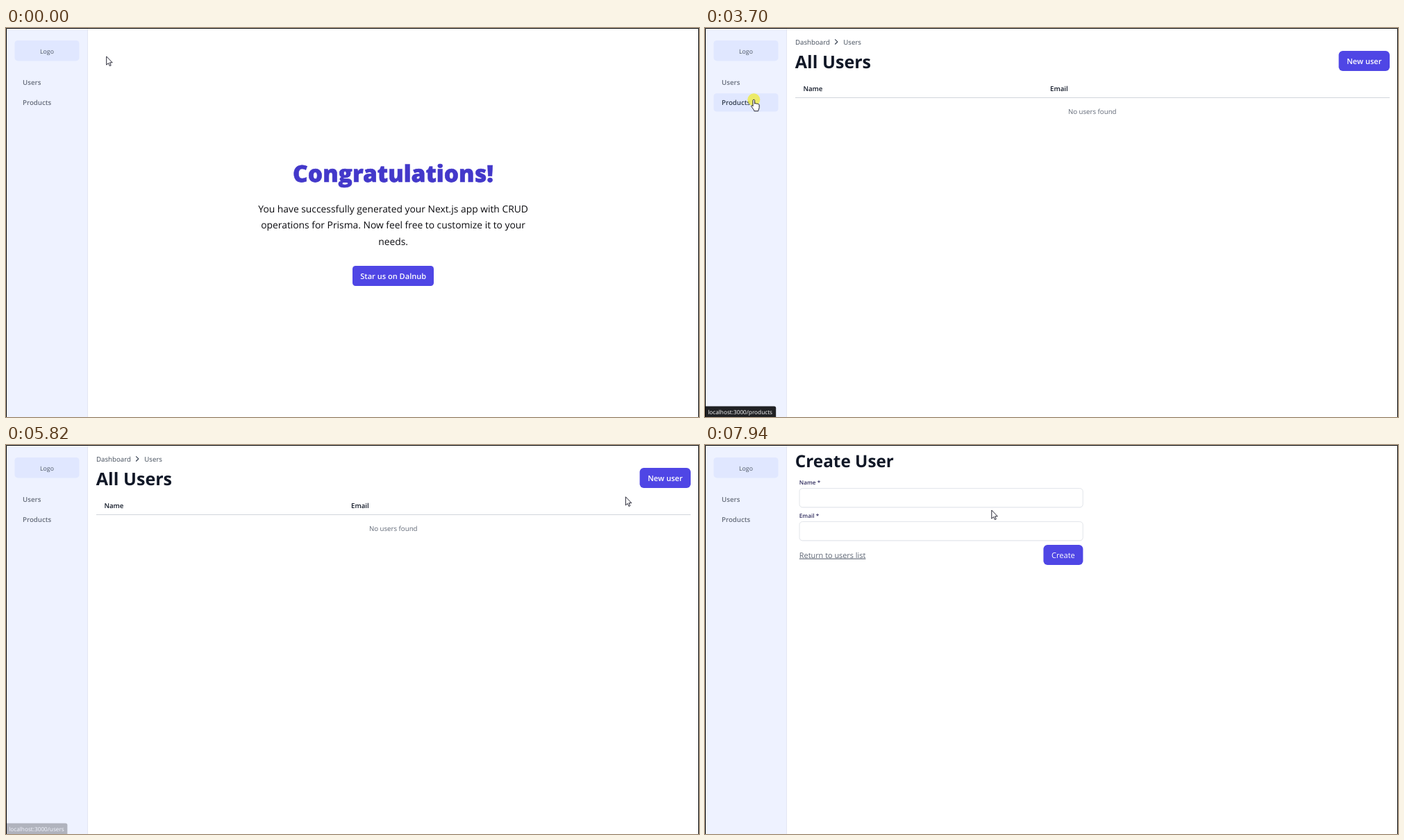
An HTML page that plays this animation: 998x561 px, repeating every 8000 ms.

```html
<!DOCTYPE html>
<html lang="en">
<head>
<meta charset="utf-8">
<title>Admin dashboard</title>
<style>
  html, body { margin: 0; width: 100%; height: 100%; overflow: hidden; background: #fff; }
  svg { display: block; width: 998px; height: 561px; }
  text { font-family: "Open Sans", "Noto Sans", sans-serif; text-rendering: geometricPrecision; white-space: pre; }
</style>
</head>
<body>
<svg id="stage" viewBox="0 0 998 561" xmlns="http://www.w3.org/2000/svg"></svg>
<script>
const LOOP = 8000;
const SMALL = 9.68, BASE = 11.06, TITLE = 25.1;
const INDIGO = '#4f46e5', INDIGO_DARK = '#4338ca', INK = '#111827', MUTED = '#5f6775';

// Markup helpers
const label = (x, y, size, str, fill, opts = '') =>
  `<text x="${x}" y="${y}" font-size="${size}" fill="${fill}" ${opts}>${str}</text>`;
const box = (x, y, w, h, r, fill, opts = '') =>
  `<rect x="${x}" y="${y}" width="${w}" height="${h}" rx="${r}" fill="${fill}" ${opts}/>`;
const group = (id, ...parts) => `<g id="${id}">${parts.join('')}</g>`;
const MID = 'text-anchor="middle"', SEMI = 'font-weight="600"', BOLD = 'font-weight="700"';

const sidebar = () => [
  box(1, 1, 117, 560, 0, '#eef2ff'),
  box(117, 1, 1, 560, 0, '#e3e7f4'),
  box(12.5, 18, 93, 29.4, 4.4, '#e0e7ff'),
  label(59, 37, 8.7, 'Logo', '#4b5563', MID),
  box(12.5, 65, 93, 26.4, 4.4, '#e0e7ff', 'id="usersBg"'),
  box(12.5, 94.2, 93, 26.4, 4.4, '#e0e7ff', 'id="productsBg"'),
  label(24, 81.8, SMALL, 'Users', MUTED, SEMI + ' id="usersText"'),
  label(24, 111, SMALL, 'Products', MUTED, SEMI + ' id="productsText"')
].join('');

const home = () => group('home',
  label(557.6, 222.3, 33.5, 'Congratulations!', INDIGO_DARK,
    `${MID} font-weight="800" stroke="${INDIGO_DARK}" stroke-width=".6"`),
  ['You have successfully generated your Next.js app with CRUD',
   'operations for Prisma. Now feel free to customize it to your',
   'needs.'].map((s, i) => label(557.6, 265.5 + i * 23.8, 13.83, s, '#0b0b0f', MID)).join(''),
  box(499, 343, 117, 29, 4.4, INDIGO),
  label(557.7, 361.9, BASE, 'Star us on Dalnub', '#fff', MID + ' ' + SEMI));

function listPage(id, name, item, left, columns) {
  const w = 986 - left, mid = left + w / 2;
  return group(id,
    label(130, 23.5, SMALL, 'Dashboard', '#414b59'),
    '<path d="M187.2 16.3l3.6 3.6l-3.6 3.6" fill="none" stroke="#374151" stroke-width="1.2"/>',
    label(199.3, 23.5, SMALL, name, '#414b59'),
    label(129.8, 58.3, TITLE, 'All ' + name, INK, BOLD),
    box(left, 33, w, 29, 5.8, INDIGO),
    box(left, 33, w, 29, 5.8, INDIGO_DARK, `class="hot" opacity="0"`),
    label(mid, 51.8, BASE, 'New ' + item, '#fff', MID + ' ' + SEMI),
    columns.map(([x, s]) => label(x, 90.6, SMALL, s, INK, SEMI)).join(''),
    box(130, 100, 856, 1, 0, '#d1d5db'),
    label(557.7, 124.2, SMALL, `No ${name.toLowerCase()} found`, MUTED, MID));
}

const field = (y, name) =>
  label(135.8, y - 5.4, 8.2, name + ' *', '#312e5f', SEMI) +
  box(136, y + 1, 408.2, 27.4, 4.4, '#f1f2f5') +
  box(136, y + .4, 408.2, 27.2, 4.4, '#fff', 'stroke="#e2e5ea"');

const createPage = () => group('create',
  label(129.8, 32, 24.3, 'Create User', INK, BOLD),
  field(62.2, 'Name'), field(110.2, 'Email'),
  label(135.8, 162.6, 10.9, 'Return to users list', MUTED, 'text-decoration="underline"'),
  box(487.4, 144, 57, 29, 5.8, INDIGO),
  label(515.9, 162.6, BASE, 'Create', '#fff', MID));

const status = () => group('status',
  '<path id="bubble" fill="#202124"/>',
  label(4.2, 556.8, 8.25, '', '#fff', 'id="url" font-weight="500"'));

const pointer = () =>
  '<circle id="click" r="9" fill="#efec3c" fill-opacity=".78"/>' +
  '<g fill="#fff" stroke-linejoin="round" stroke="#1c1c2b">' +
  '<path id="arrow" stroke-width=".95" d="M0 0V12.2L2.8 9.6L4.6 13.7L6.5 12.9L4.7 8.9H8.5Z"/>' +
  '<path id="hand" stroke-width="1" d="M-1.3 9.6V1.3a1.3 1.3 0 0 1 2.6 0V6c.3-.9 2.1-.9 2.4.2' +
  'c.5-.7 2-.5 2.2.4c.6-.5 1.9-.1 1.9 1V11.3c0 2-1.2 2.6-1.4 5.2H.6c-.3-2.2-2.4-4-4-6.4c-.8-1.6.8-2.4 2.1-.5z"/></g>';

const stage = document.getElementById('stage');
stage.innerHTML = box(0, 0, 998, 561, 0, '#fff') + sidebar() + home() +
  listPage('users', 'Users', 'user', 912.6, [[141.4, 'Name'], [497, 'Email']]) +
  listPage('products', 'Products', 'product', 893,
    [[141.4, 'Name'], [314, 'Price'], [469.8, 'Really Long Description']]) +
  createPage() + status() +
  '<path d="M.5 561V.5H997.5V561" fill="none" stroke="#000"/>' + pointer();

const $ = id => document.getElementById(id);
const show = (el, on) => el.setAttribute('visibility', on ? 'visible' : 'hidden');

// Timeline
const PAGES = [[0, 'home'], [1690, 'users'], [3860, 'products'], [4940, 'users'], [7320, 'create']];
const CLICKS = [[1560, 1760], [3700, 3930], [4870, 4940], [6580, 6720]];
const LINKS = [
  [0, '', 0], [940, 'users', 88.4], [2740, 'products', 102.2], [4460, 'users', 88.4], [6040, 'users/create', 115.4]
];
const TRAIL = [
  [0, 144.7, 41], [70, 144.7, 41], [500, 118, 62], [890, 94, 82], [1360, 72.3, 81.5],
  [2420, 72.3, 81.5], [2970, 70.3, 103.3], [4250, 70.3, 103.3], [4600, 57.5, 83], [4670, 56, 83],
  [5200, 56, 83], [5820, 891.3, 74.8], [6030, 938, 44], [6320, 943, 46], [6620, 943, 46],
  [7180, 831.4, 91.8], [7380, 790, 95], [7940, 412.8, 94], [LOOP, 412.8, 94]
];

const lastAt = (list, t) => list.filter(e => e[0] <= t).pop();
const ramp = (t, from, to) => Math.min(1, Math.max(0, (t - from) / (to - from)));

// Velocity at a trail point; zero wherever the pointer rests
function slope(i, axis) {
  const a = TRAIL[i - 1], b = TRAIL[i], c = TRAIL[i + 1];
  const same = (p, q) => p[1] === q[1] && p[2] === q[2];
  if (!a || !c || same(a, b) || same(b, c)) return 0;
  return (c[axis] - a[axis]) / (c[0] - a[0]);
}

function pointerAt(t) {
  let i = 0;
  while (i < TRAIL.length - 2 && TRAIL[i + 1][0] <= t) i++;
  const a = TRAIL[i], b = TRAIL[i + 1], d = b[0] - a[0], u = (t - a[0]) / d, v = 1 - u;
  return [1, 2].map(k =>
    v * v * (1 + 2 * u) * a[k] + u * u * (3 - 2 * u) * b[k] +
    d * u * v * (v * slope(i, k) - u * slope(i + 1, k)));
}

function hitAt(t) {
  const [x, y] = pointerAt(t), page = lastAt(PAGES, t)[1];
  if (x > 12 && x < 105.5) {
    if (y > 65 && y < 91.5) return 'usersNav';
    if (y > 94 && y < 120.6) return 'productsNav';
  }
  if (page === 'users' && x > 912.6 && x < 986 && y > 33 && y < 62) return 'button';
  return '';
}

// Share of the last 140 ms spent over an item gives its colour transition
function hover(t, name) {
  let n = 0;
  for (let k = 0; k < 8; k++) if (hitAt(Math.max(0, t - k * 20)) === name) n++;
  return n / 8;
}

const mix = (a, b, k) => `rgb(${a.map((v, i) => Math.round(v + (b[i] - v) * k))})`;

function paintNav(t, id) {
  const k = hover(t, id + 'Nav');
  $(id + 'Bg').setAttribute('opacity', k);
  $(id + 'Text').setAttribute('fill', mix([102, 109, 123], [50, 60, 76], k));
}

function paintStatus(t) {
  const [, path, w] = lastAt(LINKS, t);
  const alpha = t < 5300 ? ramp(t, 920, 1040)
    : t < 6000 ? 1 - ramp(t, 5680, 5880)
    : ramp(t, 6030, 6150) * (1 - ramp(t, 7400, 7600));
  $('status').setAttribute('opacity', path ? alpha : 0);
  $('url').textContent = 'localhost:3000/' + path;
  $('bubble').setAttribute('d', `M1 561V545.6H${w - 2.6}q2.6 0 2.6 2.6V561z`);
}

function draw(t) {
  const page = lastAt(PAGES, t)[1];
  ['home', 'users', 'products', 'create'].forEach(id =>
    $(id).setAttribute('display', id === page ? 'inline' : 'none'));
  paintNav(t, 'users');
  paintNav(t, 'products');
  $('users').querySelector('.hot').setAttribute('opacity', hover(t, 'button'));
  paintStatus(t);

  const at = `translate(${pointerAt(t).map(v => v.toFixed(2))})`;
  ['click', 'arrow', 'hand'].forEach(id => $(id).setAttribute('transform', at));
  const over = hitAt(t) !== '';
  show($('hand'), over);
  show($('arrow'), !over);
  show($('click'), CLICKS.some(([from, to]) => t >= from && t < to));
}

const start = performance.now();
function tick(now) {
  draw(Math.max(0, now - start) % LOOP);
  requestAnimationFrame(tick);
}
draw(0);
requestAnimationFrame(tick);
</script>
</body>
</html>
```
